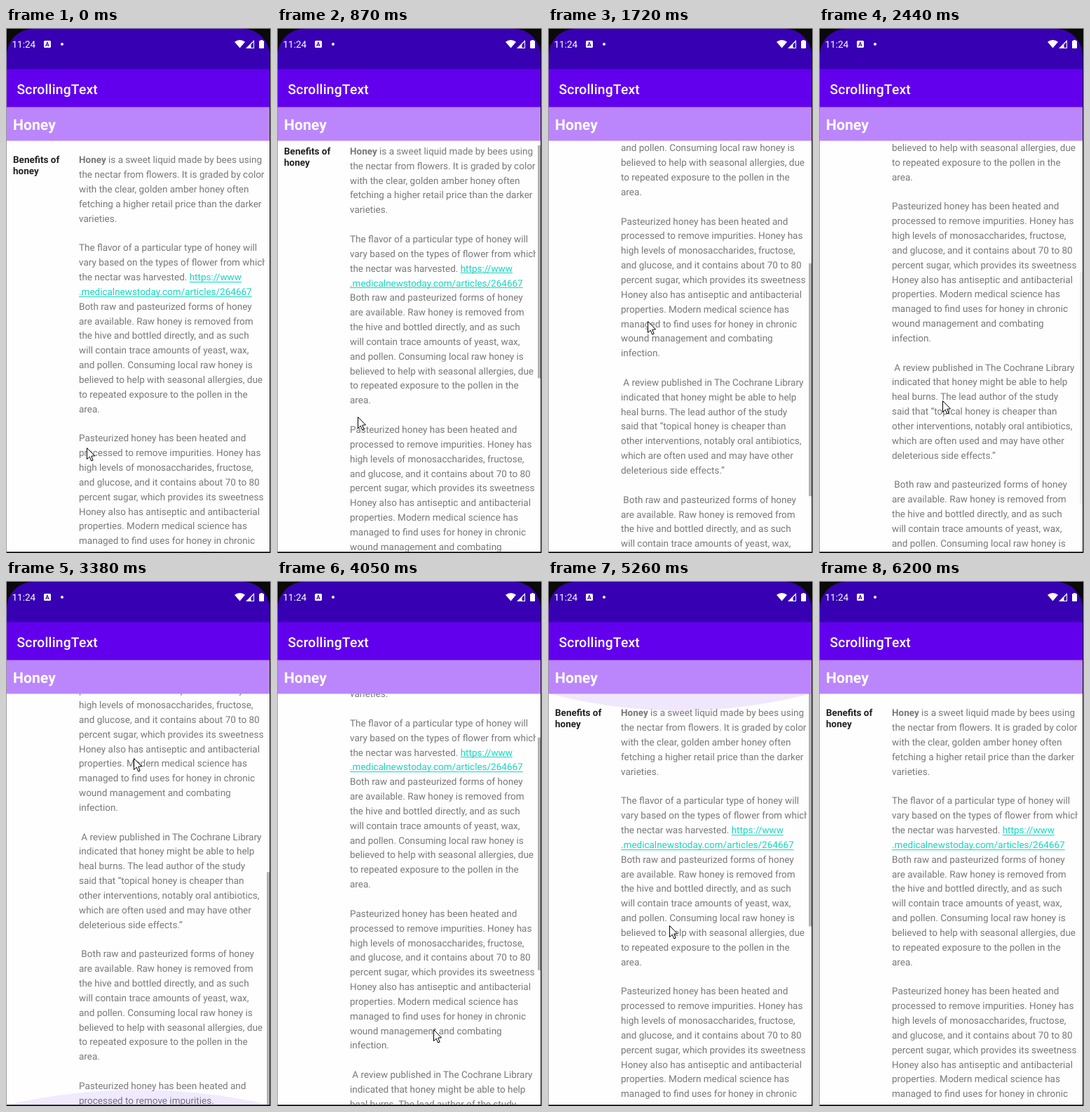
An HTML page with a canvas for the animation above (6.66 s loop, 378 by 747 pixels).

```html
<!DOCTYPE html>
<html lang="en">
<head>
<meta charset="utf-8">
<title>ScrollingText</title>
<style>
html, body { margin: 0; width: 378px; height: 747px; overflow: hidden; background: #111; }
canvas { display: block; }
</style>
</head>
<body>
<canvas id="stage" width="378" height="747"></canvas>
<script>
const ctx = document.getElementById('stage').getContext('2d');
const LOOP = 6660;
const LEFT = 1, RIGHT = 376, TOP = 160, BOTTOM = 745.5;
const VIEW = BOTTOM - TOP, WIDTH = RIGHT - LEFT;
const LINE = 20.846, BASELINE = 192.25, MAX_SCROLL = 449;
const FONT = 'px Roboto, sans-serif';
const BODY = '400 13.5' + FONT, BOLD = '700 13.5' + FONT;
const LINK = '#14d6c1';

const rawHoney = `Both raw and pasteurized forms of honey
are available. Raw honey is removed from
the hive and bottled directly, and as such
will contain trace amounts of yeast, wax,
and pollen. Consuming local raw honey is
believed to help with seasonal allergies, due
to repeated exposure to the pollen in the
area.
`;
// *bold* and _link_ mark styled runs
const article = `*Honey* is a sweet liquid made by bees using
the nectar from flowers. It is graded by color
with the clear, golden amber honey often
fetching a higher retail price than the darker
varieties.

The flavor of a particular type of honey will
vary based on the types of flower from which
the nectar was harvested. _https://www_
_.medicalnewstoday.com/articles/264667_
${rawHoney}
Pasteurized honey has been heated and
processed to remove impurities. Honey has
high levels of monosaccharides, fructose,
and glucose, and it contains about 70 to 80
percent sugar, which provides its sweetness
Honey also has antiseptic and antibacterial
properties. Modern medical science has
managed to find uses for honey in chronic
wound management and combating
infection.

 A review published in The Cochrane Library
indicated that honey might be able to help
heal burns. The lead author of the study
said that “topical honey is cheaper than
other interventions, notably oral antibiotics,
which are often used and may have other
deleterious side effects.”

 ${rawHoney}
Pasteurized honey has been heated and
processed to remove impurities.`.split('\n');

const clamp = v => Math.min(1, Math.max(0, v));
const linear = p => p;
const easeOut = p => 1 - (1 - p) ** 2;

const tickTime = n => 870 + 139 * n - 0.072 * n * n;

function tickAt(time) {
  let n = -1;
  while (tickTime(n + 1) <= time) n++;
  return n;
}

// Drags are linear, flings slow down.
const scrollMoves = [
  { from: -0.2, to: 3, end: [197] },
  { from: 3, to: 8, end: [330], ease: easeOut },
  { from: 11, to: 14, end: [MAX_SCROLL] },
  { from: 20.3, to: 23, end: [110.5] },
  { from: 23, to: 28, end: [18], ease: easeOut },
  { from: 30, to: 31, end: [0] },
];
const cursorMoves = [
  { from: -0.7, to: 3, end: [117, 362] },
  { from: 3, to: 4, end: [120, 305] },
  { from: 4, to: 9, end: [175, 585] },
  { from: 10.2, to: 15, end: [182, 252] },
  { from: 20, to: 23, end: [223, 638] },
  { from: 24.4, to: 27, end: [167, 404] },
  { from: 27, to: 28, end: [150, 289] },
  { from: 30, to: 33, end: [185, 590] },
  { from: 33, to: 35, end: [298, 600] },
  { from: 35, to: 38, end: [338, 737] },
];

function follow(moves, start, n) {
  return moves.reduce((pos, { from, to, end, ease = linear }) => {
    const k = ease(clamp((n - from) / (to - from)));
    return pos.map((v, i) => v + (end[i] - v) * k);
  }, start);
}

const barOpacity = n => Math.max(...[[0, 10], [12, 18], [21, 35]].map(
  ([show, hide]) => n < show ? 0 : clamp(1 - (n - hide) / 1.25)));

// Overscroll glow: two ticks to swell, then a quadratic release
function glowHeight(n, peak, release) {
  const k = n < peak ? clamp(1 - (peak - n) / 2) : 1 - clamp((n - peak) / release) ** 2;
  return 49 * k;
}

function box(color, x, y, w, h) {
  ctx.fillStyle = color;
  ctx.fillRect(x, y, w, h);
}

function text(str, x, y, font, color, spacing = 0) {
  ctx.font = font;
  ctx.letterSpacing = spacing + 'px';
  ctx.fillStyle = color;
  ctx.fillText(str, x, y);
  return ctx.measureText(str).width;
}

function shape(color, points) {
  ctx.fillStyle = color;
  ctx.beginPath();
  points.forEach(([x, y]) => ctx.lineTo(x, y));
  ctx.closePath();
  ctx.fill();
}

function clipTo(x, y, w, h, radii = 0) {
  ctx.beginPath();
  ctx.roundRect(x, y, w, h, radii);
  ctx.clip();
}

function drawLine(line, y) {
  let x = 104;
  for (const run of line.split(/(\*.+?\*|_.+_)/)) {
    if (!run) continue;
    const bold = run[0] === '*', link = run[0] === '_';
    const str = bold || link ? run.slice(1, -1) : run;
    const w = text(str, x, y, bold ? BOLD : BODY, link ? LINK : '#787878');
    if (link) box(LINK, x, Math.round(y + 1.7), w, 1);
    x += w;
  }
}

function drawGlow(height, edge, dir) {
  if (height <= 0) return;
  ctx.fillStyle = `rgba(98, 0, 238, ${0.04 + 0.002 * height})`;
  ctx.beginPath();
  ctx.moveTo(LEFT, edge);
  ctx.quadraticCurveTo((LEFT + RIGHT) / 2, edge + dir * 2 * height, RIGHT, edge);
  ctx.fill();
}

function drawContent(n) {
  const [scroll] = follow(scrollMoves, [0], n);
  ctx.save();
  clipTo(LEFT, TOP, WIDTH, VIEW);
  box('#fefefe', LEFT, TOP, WIDTH, VIEW);
  text('Benefits of', 10, BASELINE - scroll, BOLD, '#222');
  text('honey', 10, BASELINE + 15.8 - scroll, BOLD, '#222');

  ctx.save();
  clipTo(100, TOP, 269, VIEW);
  article.forEach((line, i) => drawLine(line, BASELINE + i * LINE - scroll));
  ctx.restore();

  const scale = VIEW / (VIEW + MAX_SCROLL);
  box(`rgba(0, 0, 0, ${0.3 * barOpacity(n)})`, 372, TOP + scroll * scale, 4, VIEW * scale);
  drawGlow(glowHeight(n, 15, 4), BOTTOM, -1);
  drawGlow(glowHeight(n, 33, 2), TOP, 1);
  ctx.restore();
}

function drawStatusIcons() {
  ctx.fillStyle = '#fff';
  ctx.beginPath();
  ctx.roundRect(54, 18, 10, 10, 1.5);
  ctx.roundRect(361, 18, 7, 11, 1);
  ctx.rect(363, 17, 3, 1);
  ctx.fill();
  text('A', 56.1, 26.2, '700 8.5' + FONT, '#3700b3');

  ctx.fillStyle = '#fff';
  ctx.beginPath();
  ctx.arc(80, 23, 2, 0, 7);
  ctx.fill();

  // wifi fan
  ctx.beginPath();
  ctx.moveTo(333.5, 28.5);
  ctx.lineTo(326, 19.8);
  ctx.quadraticCurveTo(333.5, 14.4, 341, 19.8);
  ctx.fill();

  // signal with a hollow upper part
  shape('#fff', [[342, 29], [354, 17], [354, 29]]);
  shape('#3700b3', [[349.5, 23.5], [353, 20], [353, 28], [349.5, 28]]);
}

function drawBars() {
  ctx.save();
  clipTo(LEFT, 1, WIDTH, 200, [38, 38, 0, 0]);
  box('#3700b3', LEFT, 0, WIDTH, 59);
  box('#6200ee', LEFT, 58.5, WIDTH, 54.5);
  box('#bb86fc', LEFT, 112.5, WIDTH, 48);
  ctx.restore();
  text('11:24', 8.5, 28, BODY, '#fff');
  drawStatusIcons();
  text('ScrollingText', 15.5, 94, '500 19.28' + FONT, '#fff', 0.2);
  text('Honey', 10, 145, '700 21.2' + FONT, '#fff');
}

function drawCursor(n) {
  if (n > 38) return;
  const [x, y] = follow(cursorMoves, [115, 597], n);
  ctx.save();
  ctx.translate(Math.round(x) + 0.5, Math.round(y) + 0.5);
  shape('#fff', [[0, 0], [0, 16], [3.7, 12.6], [6.3, 18.5], [8.7, 17.5], [6.2, 11.7], [11, 11.3]]);
  ctx.strokeStyle = '#000';
  ctx.stroke();
  ctx.restore();
}

function frame(time) {
  const n = tickAt(time % LOOP);
  ctx.textRendering = 'geometricPrecision';
  box('#999', 0, 0, 378, 747);
  box('#0a0a0a', LEFT, 1, WIDTH + 1, 746);
  drawContent(n);
  drawBars();
  drawCursor(n);
}

const start = performance.now();
function loop() {
  frame(performance.now() - start);
  requestAnimationFrame(loop);
}
loop();
</script>
</body>
</html>
```
